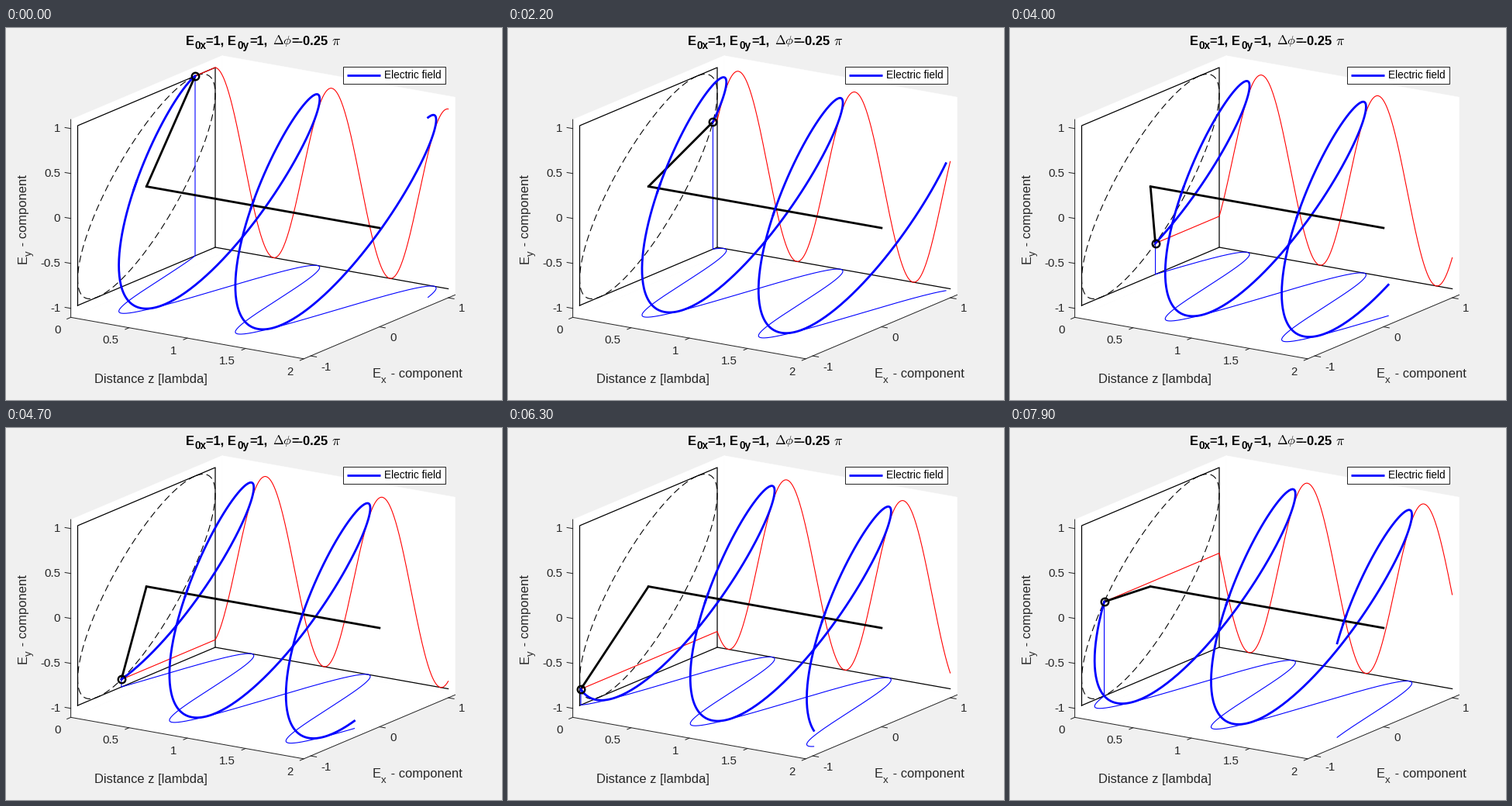
These frames come from a looping animation (640x480 px, 8 s). A matplotlib script:

```python
import numpy as np
import matplotlib.pyplot as plt
from matplotlib.animation import FuncAnimation
from matplotlib.patches import Polygon, Rectangle

plt.rcParams["font.family"] = "Liberation Sans"
plt.rcParams["lines.scale_dashes"] = False

PX = 0.72                       # points per pixel at 100 dpi
FRAMES, HOLD, PERIOD = 80, 4, 99
LAG = np.pi / 4
LIM = 1.1
GRAY = (0.15, 0.15, 0.15)
THIN, THICK = 1.1, 2.8

ORIGIN = np.array([181.25, 204.5])
EZ = np.array([150.3, 26.75])
EX = np.array([88.75, -37.5])
EY = np.array([0.0, -116.0])


def project(z, x, y):
    """Orthographic view: data coordinates to pixels."""
    z, x, y = np.broadcast_arrays(z, x, y)
    return tuple(ORIGIN[k] + z * EZ[k] + x * EX[k] + y * EY[k] for k in (0, 1))


def depth(z, x, y):
    """Closeness to the viewer."""
    return 93.6 * z - 131.3 * x + 33.0 * y


fig = plt.figure(figsize=(6.4, 4.8), dpi=100, facecolor="#f0f0f0")
ax = fig.add_axes([0, 0, 1, 1])
ax.set_xlim(0, 640)
ax.set_ylim(480, 0)
ax.axis("off")


def line(pts=((), ()), color="k", width=THIN, order=2, **kw):
    return ax.plot(*pts, color=color, lw=width * PX, zorder=order, **kw)[0]


def label(x, y, s, size, color=GRAY, ha="left", **kw):
    ax.text(x, y, s, fontsize=size * PX, color=color, ha=ha, va="baseline",
            zorder=10, **kw)


def draw_box():
    L = LIM
    walls = [
        [(0, -L, -L), (0, L, -L), (0, L, L), (0, -L, L)],
        [(0, L, -L), (2, L, -L), (2, L, L), (0, L, L)],
        [(0, -L, -L), (2, -L, -L), (2, L, -L), (0, L, -L)],
    ]
    for wall in walls:
        ax.add_patch(Polygon([project(*p) for p in wall], fc="w", ec="w",
                             lw=0.3, zorder=0))
    edge = [(0, -L, L), (0, -L, -L), (2, -L, -L), (2, L, -L)]
    line(project(*np.array(edge).T), GRAY, 1, 1)


def tick(point, step, text, shift, ha):
    px, py = project(*point)
    line(([px, px + step[0]], [py, py + step[1]]), GRAY, 1, 1)
    label(px + shift[0], py + shift[1] + 5.4, text, 15, ha=ha)


def draw_ticks():
    for v in (-1, -0.5, 0, 0.5, 1):
        tick((0, -LIM, v), (-7.5, -1.3), f"{v:g}", (-13.4, -1.5), "right")
    for v in (0, 0.5, 1, 1.5, 2):
        tick((v, -LIM, -LIM), (-4.9, 2.1), f"{v:g}", (-13.2, 15.3), "right")
    for v in (-1, 0, 1):
        tick((2, v, -LIM), (7.5, 1.3), f"{v:g}", (13.6, 13), "left")


def draw_labels():
    label(114, 458, "Distance z [lambda]", 16.5)
    label(473, 451, "E", 16.5)
    label(484, 458, "x", 13.3)
    label(491.5, 451, " - component", 16.5)
    up = dict(rotation=90, rotation_mode="anchor")
    label(26.5, 304.5, "E", 16.5, **up)
    label(32.5, 293.5, "y", 13.3, **up)
    label(26.5, 286, " - component", 16.5, **up)

    bold = dict(color="k", weight="bold")
    label(232, 21.5, "E", 16.5, **bold)
    label(243, 27, "0x", 13.6, **bold)
    label(258.5, 21.5, "=1, E", 16.5, **bold)
    label(298.5, 27, "0y", 13.6, **bold)
    label(314, 21.5, "=1,", 16.5, **bold)
    math = dict(color="k", math_fontfamily="cm")
    label(344.5, 21.5, r"$\Delta\phi$", 16.5, **math)
    label(368, 21.5, "=-0.25", 16.5, **bold)
    label(419.5, 21.5, r"$\pi$", 17.5, **math)


def draw_legend():
    ax.add_patch(Rectangle((434.5, 49.5), 132, 22, fc="w", ec=GRAY,
                           lw=PX, zorder=8))
    line(([440, 483], [60.5, 60.5]), "b", THICK, 9, solid_capstyle="butt")
    label(488, 65, "Electric field", 13.6, color="k")


def draw_guides():
    square = np.array([(-1, -1), (1, -1), (1, 1), (-1, 1), (-1, -1)]).T
    line(project(0, *square), width=1.25)
    line(project(np.array([0, 2]), 1, -1), width=1.25)
    a = np.linspace(0, 2 * np.pi, 200)
    line(project(0, np.cos(a + LAG), np.cos(a)),
         ls=(0, (9 * PX, 5 * PX)), dash_capstyle="butt")
    line(project(np.array([0, 2]), 0, 0), width=THICK, order=5)


draw_box()
draw_ticks()
draw_labels()
draw_legend()
draw_guides()

floor = line(color="b")
wall = line(color="r")
arm = line(width=THICK, order=3, solid_capstyle="round")
wave = line(color="b", width=THICK, order=4)
near = line(color="b", width=THICK, order=6, solid_capstyle="butt")
tip = line(width=0, order=7, marker="o", ms=9.5 * PX, mfc="none",
           mec="k", mew=2.4 * PX)

z = np.linspace(0, 2, 400)


def update(i):
    phase = 2 * np.pi * (z - max(0, i - HOLD) / PERIOD)
    x, y = np.cos(phase + LAG), np.cos(phase)
    x0, y0 = x[0], y[0]

    # projections start at the tip, then follow the floor and back wall
    z1 = np.r_[0, z]
    floor.set_data(*project(z1, np.r_[x0, x], np.r_[y0, -np.ones_like(z)]))
    wall.set_data(*project(z1, np.r_[x0, np.ones_like(z)], np.r_[y0, y]))
    arm.set_data(*project(0, np.array([0, x0]), np.array([0, y0])))
    tip.set_data(*project(np.zeros(1), x0, y0))

    px, py = project(z, x, y)
    wave.set_data(px, py)

    # redraw the parts passing in front of the propagation axis
    za = (px - ORIGIN[0]) / EZ[0]
    gap = np.abs(py - ORIGIN[1] - za * EZ[1])
    front = (depth(z, x, y) > depth(za, 0, 0)) & (gap < 10)
    near.set_data(np.where(front, px, np.nan), py)
    return floor, wall, arm, wave, near, tip


anim = FuncAnimation(fig, update, frames=FRAMES, interval=100, repeat=True,
                     repeat_delay=0, blit=False)
plt.show()
```
